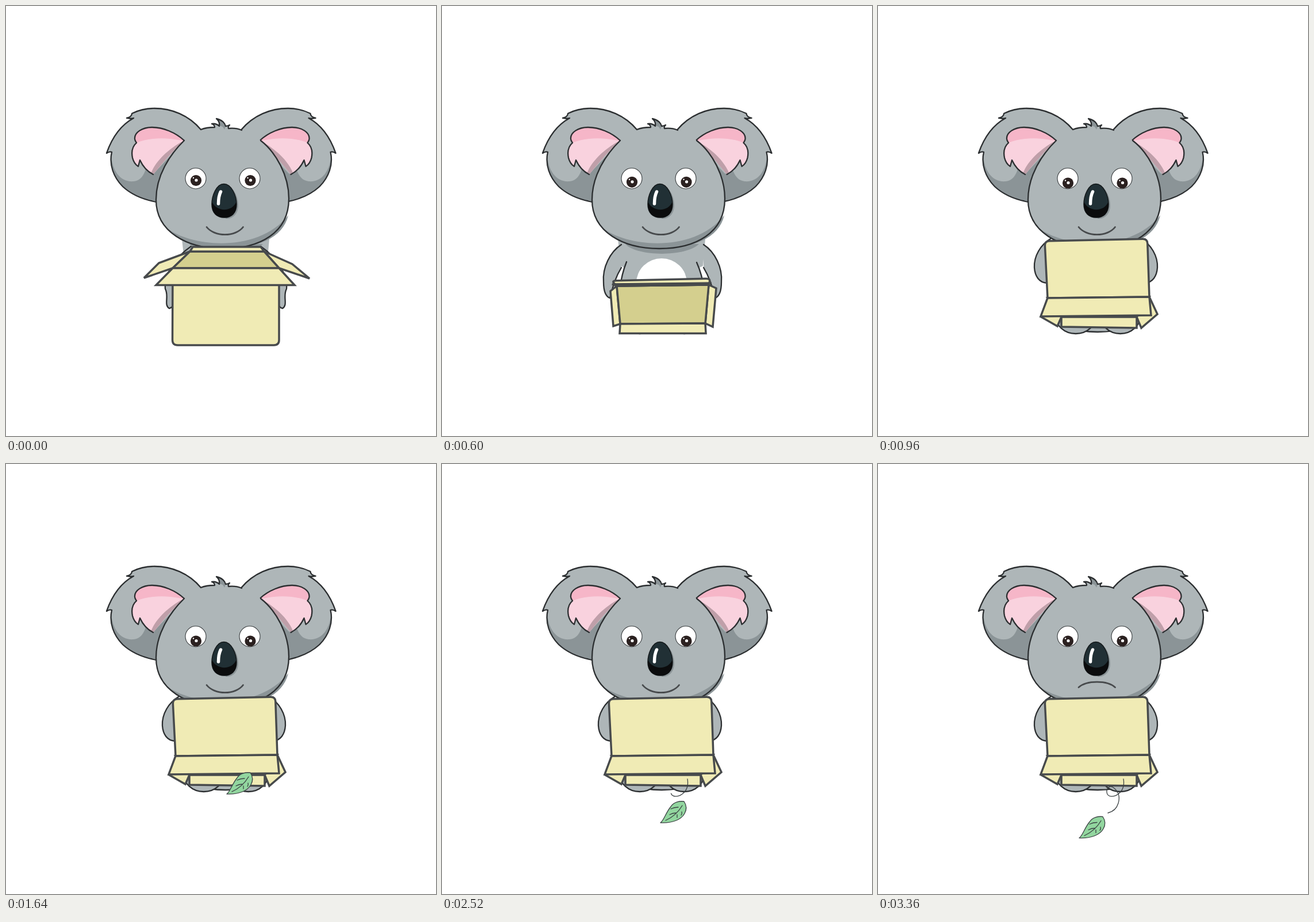
An HTML page for the animation above (4280 ms loop, 748 by 748 pixels).

```html
<!DOCTYPE html>
<html lang="en">
<head>
<meta charset="utf-8">
<title>Koala with an empty box</title>
<style>
  html, body { margin: 0; width: 100%; height: 100%; overflow: hidden; background: #fff; }
  svg { display: block; width: 100%; height: 100%; }
  .ink { stroke: #2b2e30; stroke-width: 2.3; stroke-linecap: round; stroke-linejoin: round; }
  .line { fill: none; }
  .fur { fill: #aeb6b8; }
  .shade { fill: #8b9497; }
  #box path { stroke: #474a4c; stroke-width: 3.5; fill: #f0ebb5; stroke-linejoin: miter; }
  #box #inside { fill: #d4cf8e; }
  .thin { stroke: #3b4143; stroke-width: 1.3; stroke-linecap: round; stroke-linejoin: round; }
</style>
</head>
<body>
<svg viewBox="0 0 748 748">
  <defs>
    <g id="ear">
      <path class="fur" d="M339 215C318 190 288 178 258 178C241 178 229 182 219 187C219 191 215 194 210 195C214 196 218 196 222 195C198 208 184 230 175 256C178 254 181 253 184 254C179 276 187 298 203 314C219 329 240 337 262 341L300 300Z"/>
      <path class="shade" d="M183 257C184 288 200 307 222 305C234 304 240 294 243 284L256 292L285 262L275 342C240 337 219 329 203 314C187 298 179 276 183 257Z"/>
      <path class="ink line" d="M339 215C318 190 288 178 258 178C241 178 229 182 219 187C219 191 215 194 210 195C214 196 218 196 222 195C198 208 184 230 175 256C178 254 181 253 184 254C179 276 187 298 203 314C219 329 240 337 262 341"/>
    </g>
    <g id="pink">
      <path fill="#f9d2de" d="M310 234C295 220 273 211 254 211C237 211 223 220 224 231C224 234 226 236 227 238C220 244 218 254 220 264C222 272 225 276 230 279L233 268C238 279 246 288 256 293C275 270 292 250 310 234Z"/>
      <path fill="#f6b6c8" d="M310 234C295 220 273 211 254 211C237 211 223 220 224 231C224 234 226 236 227 238C248 229 277 228 306 234Z"/>
      <path fill="#bf9fa9" d="M310 234C288 245 262 266 252 291L256 293C275 270 292 250 310 234Z"/>
      <path class="ink line" d="M310 234C295 220 273 211 254 211C237 211 223 220 224 231C224 234 226 236 227 238C220 244 218 254 220 264C222 272 225 276 230 279L233 268C238 279 246 288 256 293"/>
    </g>
    <g id="pupil">
      <circle r="9.6" fill="#2b2120"/>
      <circle cx=".5" cy="-.5" r="2.6" fill="#fff"/>
      <circle cx="-4.5" cy="-4.5" r="1.2" fill="#fff"/>
    </g>
  </defs>

  <use href="#ear"/>
  <use href="#ear" transform="matrix(-1 0 0 1 748.5 0)"/>
  <use href="#pink"/>
  <use href="#pink" transform="matrix(-1 0 0 1 751.5 0)"/>

  <path class="fur" d="M306 405L311 452L317 455C309 480 306 510 309 535C312 558 345 567 382 567C420 567 452 558 456 538C459 510 456 480 448 455L454 452L458 405Z"/>
  <path class="ink line" d="M321 445C309 475 306 510 309 535C312 558 345 567 382 567C420 567 454 558 457 538C460 510 456 475 443 446"/>
  <ellipse cx="382" cy="482" rx="44" ry="43" fill="#fff"/>
  <ellipse class="fur ink" cx="344" cy="537" rx="36" ry="33"/>
  <ellipse class="fur ink" cx="421.500" cy="537" rx="35.500" ry="33"/>
  <path id="armL" class="fur ink"/>
  <path id="armR" class="fur ink"/>
  <path class="shade" d="M319 414C338 436 424 437 447 414Z"/>

  <path class="fur" d="M310 234C322 227 330 219 339 215C348 211 356 211 363 211C363 208 361 206 358 205C364 204 368 206 371 209C372 203 370 199 366 196C376 198 381 204 382 209C385 209 387 208 389 207C387 209 386 211 387 213C396 212 403 213 410 216C420 219 432 226 443 234C470 255 492 295 492 335C492 395 441 422 378 422C315 422 261 393 261 337C261 295 285 258 310 234Z"/>
  <path class="shade" d="M279 386C325 421 440 429 491 364C482 404 436 422 378 422C335 422 299 409 279 386Z"/>
  <path class="shade" d="M371 209C372 203 370 199 366 196C376 198 381 204 382 209L380 215C378 210 375 208 371 209Z"/>
  <path class="ink line" d="M339 215C348 211 356 211 363 211C363 208 361 206 358 205C364 204 368 206 371 209C372 203 370 199 366 196C376 198 381 204 382 209C385 209 387 208 389 207C387 209 386 211 387 213C396 212 403 213 410 216"/>
  <path class="ink line" d="M310 234C285 258 261 295 261 337C261 393 315 422 378 422C441 422 492 395 492 335C492 295 470 255 443 234"/>

  <g fill="#fff" stroke="#3b3f41" stroke-width="1.100">
    <circle cx="330" cy="300" r="18"/>
    <circle cx="424" cy="300" r="18"/>
  </g>
  <g id="look">
    <use href="#pupil" x="330.500"/>
    <use href="#pupil" x="425"/>
  </g>

  <path class="shade" d="M381 311C396 313 404 332 404 347C404 362 394 371 382 370Z"/>
  <path id="nose" fill="#213035" stroke="#14191b" stroke-width="1.500" d="M379 309.500C392 309.500 401 330 401 345C401 360 392 368 380 368C367 368 358 360 358 345C358 330 366 309.500 379 309.500Z"/>
  <path fill="#0b0c0d" d="M358.500 341C366 358 393 359 400.500 341C403 360 392 368 380 368C367 368 357 360 358.500 341Z"/>
  <path d="M373.500 323C370.500 329 369.500 337 369.500 344" fill="none" stroke="#fff" stroke-width="5.500" stroke-linecap="round"/>
  <path id="mouth" fill="none" stroke="#474a4c" stroke-width="2.800" stroke-linecap="round"/>

  <g id="box">
    <path id="front"/><path id="left"/><path id="right"/><path id="inside"/>
    <path id="near"/><path id="back"/><path id="far"/>
  </g>

  <path id="trail" class="thin line" pathLength="100" d="M427 548C429 560 426 568 418 574C410 580 399 580 398 571C397 562 405 558 411 564C419 571 421 580 418 590C415 600 408 605 400 607"/>
  <g id="leaf">
    <path class="thin" fill="#92d69f" d="M0 0C6-4 9-17 18-28C23-36 33-38 41-37C45-31 46-23 42-16C36-5 20 1 0 0Z"/>
    <path class="thin line" d="M9-4C20-9 31-18 38-30M18-24Q24-27 31-27M16-14Q21-17 27-17M29-9L29-14M36-13Q38-16 37-19"/>
  </g>
</svg>
<script>
const LOOP = 4280, STEP = 40;
const $ = id => document.getElementById(id);
const set = (id, name, value) => $(id).setAttribute(name, value);

// Box corner pairs (left, right) at each key time
const boxTimes = [0, 280, 600, 960];
const corners = {
  farEdge:  [[320,427,449,427], [311,458,456,458], [304,487,464,485], [295,508,472,506]],
  nearEdge: [[290,456,475,456], [300,515,467,514], [310,553,458,552], [319,541,450,541]],
  farFlap:  [[325,419,443,419], [315,446,453,446], [296,484,466,482], [283,540,475,538]],
  nearFlap: [[261,485.5,502,485.5], [288,537,478,536], [309,569.5,459,569.5], [319,558,450,560]],
  sideFar:  [[266,447,498,449], [283,466,484,466], [293,496,477,491], [284,541,486,536]],
  sideNear: [[240,473,528,474], [271,522,497,523], [298,557,471,558], [312,557,458,560]],
  base:     [[289.5,590,475,590], [303,530,463,530], [311,560,457,560], [319,548,450,548]],
  rear:     [[320,427,449,427], [311,458,456,458], [295,478,467,474], [290,409,468.5,405]]
};

// Left arm: start point and three curves; the last number is the mirror sum
const arms = [
  [322,418, 290,440,275,470,277,492, 284,505,274,520,284,526, 296,524,300,490,312,455, 765],
  [322,416, 298,430,284,450,282,480, 281,500,283,515,292,519, 300,520,303,480,312,455, 764],
  [312,415, 292,428,279,455,281,480, 281,495,284,505,292,508, 297,490,300,475,312,455, 767],
  [300,405, 283,415,271,435,272,455, 273,470,280,481,294,482, 300,470,306,460,312,455, 758]
];

// Leaf tip: time, x, y
const drift = [
  [1640,384,574], [1770,357,593], [1890,333,593], [2000,340,585],
  [2160,357,592], [2340,381,606], [2520,380,624], [2720,371,639],
  [3000,357,648], [3280,350,650.5]
];

const clamp = v => Math.max(0, Math.min(1, v));
const ramp = (t, from, to) => clamp((t - from) / (to - from));
const mix = (a, b, k) => a + (b - a) * k;

function blend(times, keys, t) {
  let i = 0;
  while (i < times.length - 2 && t >= times[i + 1]) i++;
  const k = ramp(t, times[i], times[i + 1]);
  return keys[i].map((v, n) => mix(v, keys[i + 1][n], k));
}

// Smooth curve through timed points
function glide(keys, t) {
  let i = 0;
  while (i < keys.length - 2 && t >= keys[i + 1][0]) i++;
  const a = keys[i], b = keys[i + 1];
  const before = keys[i - 1] || a, after = keys[i + 2] || b;
  const span = b[0] - a[0], k = ramp(t, a[0], b[0]), q = k * k, c = q * k;
  return [1, 2].map(n => {
    const m0 = (b[n] - before[n]) / (b[0] - before[0]) * span;
    const m1 = (after[n] - a[n]) / (after[0] - a[0]) * span;
    return (2*c - 3*q + 1) * a[n] + (c - 2*q + k) * m0 + (3*q - 2*c) * b[n] + (c - q) * m1;
  });
}

const polygon = points => "M" + points.map(p => p.join(" ")).join("L") + "Z";

// Panel hung on an edge, its two free corners rounded
function panel(edge, free, radius) {
  const [a, b] = edge, [c, d] = free;
  const toward = (p, q) => {
    const len = Math.hypot(q[0] - p[0], q[1] - p[1]) || 1;
    const k = Math.min(radius / len, .5);
    return [mix(p[0], q[0], k), mix(p[1], q[1], k)];
  };
  return `M${a}L${toward(c, a)}Q${c} ${toward(c, d)}L${toward(d, c)}Q${d} ${toward(d, b)}L${b}Z`;
}

function drawBox(t) {
  const p = {};
  for (const name in corners) {
    const [x1, y1, x2, y2] = blend(boxTimes, corners[name], t);
    p[name] = [[x1, y1], [x2, y2]];
  }
  const quad = (a, b) => polygon([a[0], a[1], b[1], b[0]]);
  const side = n => polygon([p.farEdge[n], p.sideFar[n], p.sideNear[n], p.nearEdge[n]]);
  set("front", "d", panel(p.nearEdge, p.base, 9));
  set("left", "d", side(0));
  set("right", "d", side(1));
  set("inside", "d", quad(p.farEdge, p.nearEdge));
  set("near", "d", quad(p.nearEdge, p.nearFlap));
  set("back", "d", panel(p.farEdge, p.rear, 8));
  set("far", "d", quad(p.farEdge, p.farFlap));
}

function drawArms(t) {
  const v = blend(boxTimes, arms, t), sum = v.pop();
  const curve = n => `M${n.slice(0, 2)}C${n.slice(2)}`;
  set("armL", "d", curve(v));
  set("armR", "d", curve(v.map((n, i) => i % 2 ? n : sum - n)));
}

function drawMouth(t) {
  const k = ramp(t, 2760, 3360), end = mix(384.5, 388.5, k), mid = mix(402, 376, k);
  set("mouth", "d", `M349 ${end}C363 ${mid} 399 ${mid} 412.500 ${end}`);
}

function drawLeaf(t) {
  $("leaf").style.display = t < 1640 ? "none" : "";
  set("leaf", "transform", `translate(${glide(drift, t)})`);
  const drawn = 100 * ramp(t, 2010, 3280);
  $("trail").style.display = drawn ? "" : "none";
  set("trail", "stroke-dasharray", `${drawn} 200`);
}

function draw(t) {
  drawBox(t);
  drawArms(t);
  set("look", "transform", `translate(0 ${mix(303.5, 308, ramp(t, 0, 960))})`);
  drawMouth(t);
  drawLeaf(t);
}

const start = performance.now();
function tick() {
  const t = (performance.now() - start) % LOOP;
  draw(Math.floor(t / STEP) * STEP);
  requestAnimationFrame(tick);
}
draw(0);
requestAnimationFrame(tick);
</script>
</body>
</html>
```
